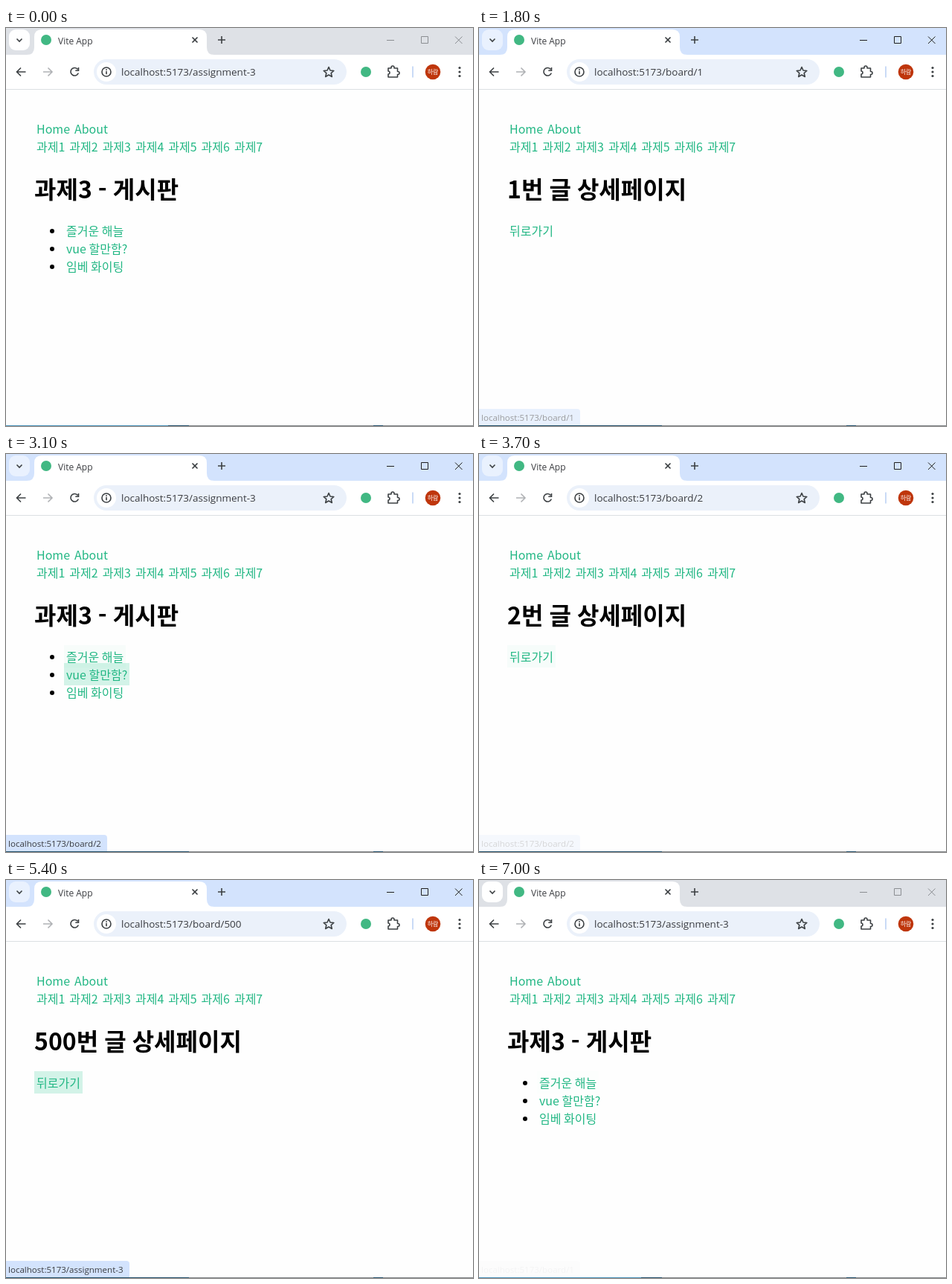
An HTML page that plays this animation: 628 px wide and 535 px high, repeating every 7.1 s.

```html
<!DOCTYPE html>
<html lang="ko">
<head>
<meta charset="utf-8">
<title>Vite App</title>
<style>
  html, body { margin: 0; width: 100%; height: 100%; overflow: hidden; background: #fefefe; }
  svg { display: block; }
  text { white-space: pre; }
  .ui { font-family: "Open Sans", "Noto Sans", sans-serif; fill: #3a3c40; }
  .page { font: 16px "Noto Sans CJK KR", "Noto Sans CJK", sans-serif; word-spacing: -.055em; }
  .page .link { fill: #22b784; }
  .page .title { font-size: 32px; font-weight: 700; }
  .hover { fill: hsl(160 100% 37%); fill-opacity: .2; opacity: 0; }
  .icon { fill: none; stroke: #3c4043; stroke-width: 1.6; }
</style>
</head>
<body>
<svg width="628" height="535" viewBox="0 0 628 535">
  <!-- tab strip -->
  <rect id="strip" width="628" height="36"/>
  <rect id="search" x="4" y="2" width="28" height="28" rx="9"/>
  <path class="icon" d="M14.500 14.500l3.500 3.500 3.500-3.500"/>
  <path fill="#fff" d="M28 36q10 0 10-10V12q0-10 10-10H260q10 0 10 10V26q0 10 10 10z"/>
  <circle cx="54" cy="16" r="7" fill="#41b883"/>
  <text class="ui" x="70" y="22" font-size="12">Vite App</text>
  <path class="icon" d="M250.500 12.500l7 7m0-7l-7 7M285 16h10m-5-5v10"/>
  <path id="controls" fill="none" d="M512 16.500h10M558.500 11.500h9v9h-9zM604 11.500l9.500 9.500m0-9.500l-9.500 9.500"/>

  <!-- toolbar -->
  <rect y="36" width="628" height="46" fill="#fff"/>
  <path stroke="#dcdfe3" d="M0 82.500H628"/>
  <path class="icon" d="M26.500 59H14.500m5.500-5.500L14.500 59l5.500 5.500"/>
  <path class="icon" style="stroke:#b0b2b5" d="M50 59H62m-5.500-5.500L62 59l-5.500 5.500"/>
  <path class="icon" d="M96.500 55.500a5.300 5.300 0 1 0 .8 5M97.500 53v4.200h-4.200"/>
  <rect x="118" y="42" width="340" height="34" rx="17" fill="#ebf1fa"/>
  <circle cx="135" cy="59" r="13" fill="#fff"/>
  <circle class="icon" cx="135" cy="59" r="6"/>
  <path class="icon" d="M135 58v4.200M135 55.300v1.600"/>
  <text id="url" class="ui" x="155" y="64" font-size="13.500"></text>
  <path class="icon" stroke-linejoin="round" d="M434 52.500l2 4.500 4.800.5-3.600 3.200 1.100 4.800-4.300-2.500-4.300 2.500 1.100-4.800-3.600-3.200 4.800-.5z"/>
  <circle cx="484" cy="59" r="7" fill="#41b883"/>
  <path class="icon" stroke-linejoin="round" d="M514 54h4v-1a2 2 0 0 1 4 0v1h4.500v4.500h.5a2 2 0 0 1 0 4h-.5V66H514v-4a2 2 0 0 0 0-4z"/>
  <path stroke="#c9dbf6" stroke-width="2" d="M547 51.500v15"/>
  <circle cx="574" cy="59" r="10.300" fill="#bf360c"/>
  <text class="page" x="574" y="62" style="font-size:8px" fill="#fff" text-anchor="middle">하람</text>
  <g fill="#3c4043">
    <circle cx="610" cy="53.500" r="1.600"/><circle cx="610" cy="59" r="1.600"/><circle cx="610" cy="64.500" r="1.600"/>
  </g>

  <!-- page -->
  <g class="page">
    <g id="nav"></g>
    <text id="title" class="title" x="38" y="229"></text>
    <g id="list"></g>
    <g id="detail">
      <rect id="back" class="hover" x="38" y="257" width="65" height="30"/>
      <text class="link" x="41" y="279">뒤로가기</text>
    </g>
  </g>

  <!-- link status and bottom edge -->
  <g id="status">
    <path id="bubble"/>
    <text id="address" class="ui" x="3" y="527.500" font-size="11.550"></text>
  </g>
  <path stroke="#85888b" d="M0 534.500H628"/>
  <path id="edge" d="M0 534.500H218"/>
  <path stroke="#24516c" d="M218 534.500H246M494 534.500H507"/>
</svg>
<script>
const LOOP = 7100, STEP = 100;
const $ = id => document.getElementById(id);
const HOST = 'localhost:5173/', BOARD = 'assignment-3';

// [time, value], each valid until the next entry
const pages = [[0, BOARD], [1500, 'board/1'], [2600, BOARD], [3300, 'board/2'],
  [4200, BOARD], [4900, 'board/500'], [6000, BOARD]];

// [address, shown, hidden, fade out time]
const statuses = [
  ['board/2', 850, 1050, 0], ['board/1', 1050, 1700, 200],
  [BOARD, 2250, 2600, 0], ['board/1', 2600, 2900, 0], ['board/2', 2900, 3500, 250],
  [BOARD, 3850, 4200, 0], ['board/1', 4200, 4350, 0], ['board/2', 4350, 4450, 0],
  ['board/500', 4450, 5000, 200], [BOARD, 5350, 6000, 0], ['board/1', 6000, 6800, 210]];

// [link, pointer enters, pointer leaves]
const hovers = [
  ['item2', 510, 1000], ['item1', 1000, 1500], ['back', 2020, 2600],
  ['item1', 2600, 2880], ['item2', 2880, 3300], ['back', 3645, 4200],
  ['item1', 4200, 4350], ['item2', 4350, 4400], ['item3', 4400, 4900],
  ['back', 5180, 6000], ['item1', 6000, 6700]];

const widths = { [BOARD]: 166, 'board/500': 149 };

const clamp = p => Math.min(1, Math.max(0, p));

// CSS "ease" curve
function ease(p) {
  let lo = 0, hi = 1;
  for (let i = 0; i < 20; i++) {
    const u = (lo + hi) / 2;
    if (.75 * u - .75 * u * u + u ** 3 < p) lo = u; else hi = u;
  }
  return .3 * lo + 2.4 * lo * lo - 1.7 * lo ** 3;
}

const fade = ms => ease(clamp(ms / 400));
const glow = (t, on, off) => t < on ? 0 : fade(Math.min(t, off) - on) * (1 - fade(t - off));

function build() {
  const link = (x, y, text) => `<text class="link" x="${x}" y="${y}">${text}</text>`;
  let nav = link(41, 142, 'Home') + link(92, 142, 'About');
  for (let i = 0; i < 7; i++) nav += link(41 + i * 44.32, 166, '과제' + (i + 1));
  $('nav').innerHTML = nav;
  $('list').innerHTML = ['즐거운 해늘', 'vue 할만함?', '임베 화이팅'].map((text, i) => {
    const y = 257 + i * 24;
    return `<circle cx="62" cy="${y + 16}" r="3"/>
      <rect id="item${i + 1}" class="hover" x="78" y="${y}" width="${i == 1 ? 88 : 83}" height="30"/>
      ${link(81, y + 22, text)}`;
  }).join('');
}

function draw(t) {
  const [since, page] = pages.findLast(([at]) => at <= t);
  const isList = page == BOARD;
  $('url').textContent = HOST + page;
  $('title').textContent = isList ? '과제3 - 게시판' : page.slice(6) + '번 글 상세페이지';
  $('list').style.display = isList ? '' : 'none';
  $('detail').style.display = isList ? 'none' : '';

  const active = t >= 1400 && t < 6600;
  const tint = active ? '#d3e3fd' : '#dee1e6';
  $('strip').style.fill = $('bubble').style.fill = tint;
  $('search').style.fill = active ? '#e9f1fe' : '#fff';
  $('controls').style.stroke = active ? '#1f1f1f' : '#8b8e92';
  $('edge').style.stroke = active ? '#24516c' : '#4b93ba';

  const level = { item1: 0, item2: 0, item3: 0, back: 0 };
  for (const [id, on, off] of hovers)
    if (on >= since) level[id] = Math.max(level[id], glow(t, on, off));
  for (const id in level) $(id).style.opacity = level[id];

  const shown = statuses.find(([, on, off, out]) => t >= on && t < off + out);
  $('status').style.display = shown ? '' : 'none';
  if (!shown) return;
  const [address, , off, out] = shown;
  $('address').textContent = HOST + address;
  $('bubble').setAttribute('d', `M0 512H${(widths[address] || 136) - 4}q4 0 4 4V534H0z`);
  $('status').style.opacity = out ? 1 - clamp((t - off) / out) : 1;
}

build();
const start = performance.now();
function tick() {
  const t = (performance.now() - start) % LOOP;
  draw(Math.floor(t / STEP) * STEP);
  requestAnimationFrame(tick);
}
tick();
</script>
</body>
</html>
```
